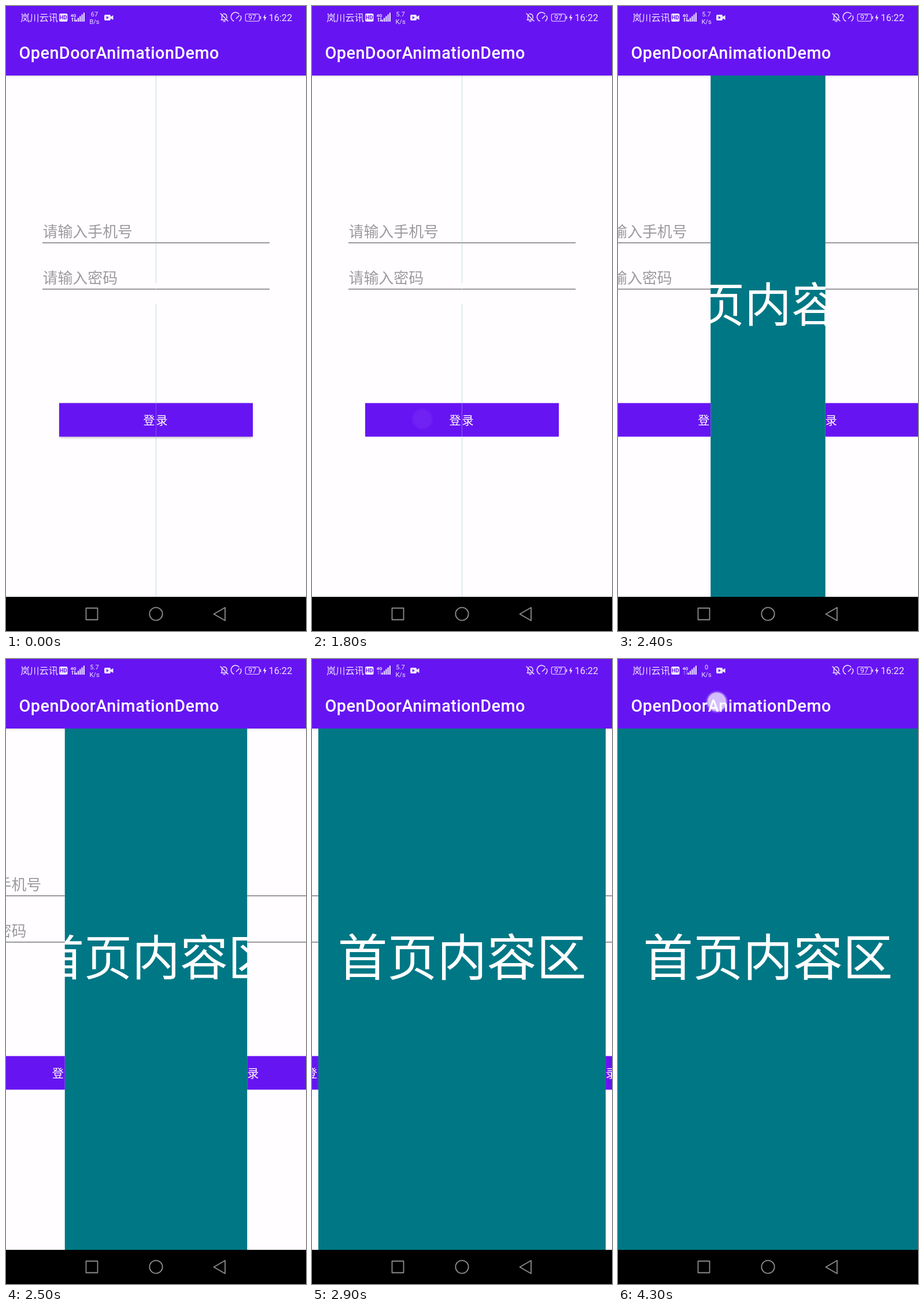
Write an HTML page that moves like this. It is 519 px wide and 1079 px high and loops after 4400 ms.

```html
<!DOCTYPE html>
<html lang="zh-CN">
<head>
<meta charset="utf-8">
<title>OpenDoorAnimationDemo</title>
<style>
  html, body { margin: 0; width: 100%; height: 100%; overflow: hidden; background: #fffdff; }
  svg { display: block; width: 100%; height: 100%; }
  text { font-family: Roboto, "Noto Sans CJK SC", "Noto Sans CJK", sans-serif; }
  .cjk { font-family: "Noto Sans CJK SC", "Noto Sans CJK", sans-serif; }
  .mid { text-anchor: middle; }
  .hint { font-size: 25.92px; fill: #9d9a9f; }
  .button-label { font-size: 20.16px; font-weight: 500; letter-spacing: 1.8px; fill: #fff; }
  .home { font-size: 86.4px; fill: #fff; }
  .title { font-size: 28.8px; font-weight: 500; letter-spacing: .45px; fill: #fff; }
  .status { fill: #eee6fd; }
  .line { fill: none; stroke: #eee6fd; stroke-width: 1.5; stroke-linecap: round; stroke-linejoin: round; }
  .nav { fill: none; stroke: #8c8c8c; stroke-width: 1.8; stroke-linejoin: round; }
</style>
</head>
<body>
<svg viewBox="0 0 519 1079" preserveAspectRatio="none">
  <defs>
    <clipPath id="leftHalf"><rect y="120" width="259.5" height="900"/></clipPath>
    <clipPath id="rightHalf"><rect x="259.5" y="120" width="259.5" height="900"/></clipPath>
    <clipPath id="buttonArea"><rect x="92" y="685.5" width="335" height="58"/></clipPath>
    <filter id="soft" x="-20%" y="-50%" width="140%" height="200%"><feGaussianBlur stdDeviation="2"/></filter>
    <linearGradient id="barShade" x2="0" y2="1">
      <stop stop-color="#000" stop-opacity=".13"/>
      <stop offset="1" stop-color="#000" stop-opacity="0"/>
    </linearGradient>
    <radialGradient id="touchFill">
      <stop stop-color="#fff" stop-opacity=".72"/>
      <stop offset=".76" stop-color="#fff" stop-opacity=".72"/>
      <stop offset=".86" stop-color="#fff" stop-opacity=".25"/>
      <stop offset="1" stop-color="#fff" stop-opacity="0"/>
    </radialGradient>

    <g id="form">
      <rect y="120" width="519" height="900" fill="#fffdff"/>
      <rect y="120" width="519" height="4" fill="url(#barShade)"/>
      <text class="cjk hint" x="63.5" y="399">请输入手机号</text>
      <text class="cjk hint" x="63.5" y="479">请输入密码</text>
      <path d="M63 408.7H456M63 488.8H456" stroke="#7d7982" stroke-width="1.6"/>
      <rect id="shadow" x="93" y="687" width="333" height="58" filter="url(#soft)"/>
      <rect x="92" y="685.5" width="335" height="58" fill="#6714f3"/>
      <circle id="ripple" cx="191" cy="713" clip-path="url(#buttonArea)" fill="#fff" opacity="0"/>
      <text class="cjk button-label mid" x="259.5" y="722.5">登录</text>
    </g>
  </defs>

  <rect y="120" width="519" height="900" fill="#007785"/>
  <g id="home"><text class="cjk home mid" x="259.5" y="547">首页内容区</text></g>
  <g id="leftDoor"><use href="#form" clip-path="url(#leftHalf)"/></g>
  <g id="rightDoor"><use href="#form" clip-path="url(#rightHalf)"/></g>

  <rect width="519" height="120" fill="#6714f3"/>
  <text class="title" x="22.5" y="90.5">OpenDoorAnimationDemo</text>

  <g class="status">
    <text class="cjk" x="25" y="26" font-size="16.3">岚川云讯</text>
    <rect x="92" y="13" width="14.5" height="14" rx="2.5"/>
    <text class="mid" x="99.2" y="23.4" font-size="9.5" font-weight="700" style="fill:#6714f3">HD</text>
    <text x="111.5" y="18.5" font-size="8" font-weight="700">4G</text>
    <path id="arrows" d="M113 22l2-2 2 2h-1.3v5h-1.4v-5zM117 25h1.3v-5h1.4v5H121l-2 2z"/>
    <path d="M120.5 23.5h2.2V27h-2.2zM123.9 20.5h2.2V27h-2.2zM127.2 17.5h2.2V27h-2.2zM130.5 14.5h2.2V27h-2.2zM133.8 11.5h2.2V27h-2.2z"/>
    <text id="speed" class="mid" x="153" y="17.8" font-size="11"></text>
    <text id="unit" class="mid" x="153" y="30.5" font-size="11"></text>
    <path d="M172 15h7a2 2 0 0 1 2 2v1.500l4.500-2.500v8l-4.500-2.500v1.500a2 2 0 0 1-2 2h-7a2 2 0 0 1-2-2v-6a2 2 0 0 1 2-2z"/>
    <path d="M173.800 17.500l4 2.500-4 2.500z" style="fill:#6714f3"/>
    <text class="mid" x="426" y="24.300" font-size="12.500">97</text>
    <path d="M439.500 17.500h1.700v5h-1.700zM448.500 13.500l-3.700 7.300h2.500l-.7 5.700 4-7.500h-2.700z"/>
    <text x="454.500" y="25.700" font-size="16.300">16:22</text>
  </g>
  <g class="line">
    <path d="M371 13l13 13M372 24h9.500M373.500 23.500v-6l1-2.500M376 13.500a5 5 0 0 1 6 4.500v3M376 26.500h3"/>
    <path d="M394 26a7.800 7.800 0 1 1 9-12.300M406 17a7.800 7.800 0 0 1-2 9M398.500 21.500l5-5"/>
    <rect x="414.300" y="13.700" width="24" height="12.600" rx="2.500" stroke-width="1.100"/>
  </g>

  <rect y="1020" width="519" height="59"/>
  <g class="nav">
    <rect x="138.500" y="1039.500" width="20" height="20"/>
    <circle cx="259.500" cy="1049.500" r="11.200"/>
    <path d="M379 1038.500v22.500l-19.500-11.300z"/>
  </g>
  <circle id="touch" r="20" fill="url(#touchFill)"/>
</svg>
<script>
  const LOOP = 4400, STEP = 100, HALF = 259.5, TEXT_Y = 514;
  const OPEN_AT = 2200, OMEGA = 0.00725;
  const $ = id => document.getElementById(id);
  const set = (id, attrs) => {
    for (const name in attrs) $(id).setAttribute(name, attrs[name]);
  };

  // Critically damped spring from closed (0) to open (1).
  function doorOpen(t) {
    if (t < OPEN_AT) return 0;
    const x = OMEGA * Math.max(20, t - OPEN_AT - 17);
    return 1 - (1 + x) * Math.exp(-x);
  }

  function touchOpacity(t) {
    if (t >= 4200) return t < 4300 ? 0.5 : 1;
    if (t < 1400 || t >= 1900) return 0;
    return [0.6, 1, 0.8, 0.35, 0.08][(t - 1400) / STEP];
  }

  function draw(t) {
    const open = doorOpen(t), shift = open * HALF, scale = 0.9 + 0.1 * open;
    set('leftDoor', { transform: `translate(${-shift})` });
    set('rightDoor', { transform: `translate(${shift})` });
    set('home', { transform: `translate(${HALF} ${TEXT_Y}) scale(${scale}) translate(${-HALF} ${-TEXT_Y})` });

    const pressed = t >= 1400 && t < 1800;
    set('shadow', { opacity: t >= 1800 ? 0 : pressed ? 0.4 : 0.28, y: pressed ? 690 : 687 });
    set('ripple', { r: Math.max(0, t - 1400) * 0.8, opacity: pressed ? 0.1 : 0 });

    const late = t >= 4200;
    set('touch', { cx: late ? 171 : 191, cy: late ? 74 : 713, opacity: touchOpacity(t) });
    set('arrows', { opacity: t >= 2800 ? 0.35 : 1 });
    $('speed').textContent = t < 1200 ? '67' : late ? '0' : '5.7';
    $('unit').textContent = t < 1200 ? 'B/s' : 'K/s';
  }

  const start = performance.now();
  function tick() {
    const t = (performance.now() - start) % LOOP;
    draw(Math.floor(t / STEP) * STEP);
    requestAnimationFrame(tick);
  }
  tick();
</script>
</body>
</html>
```
